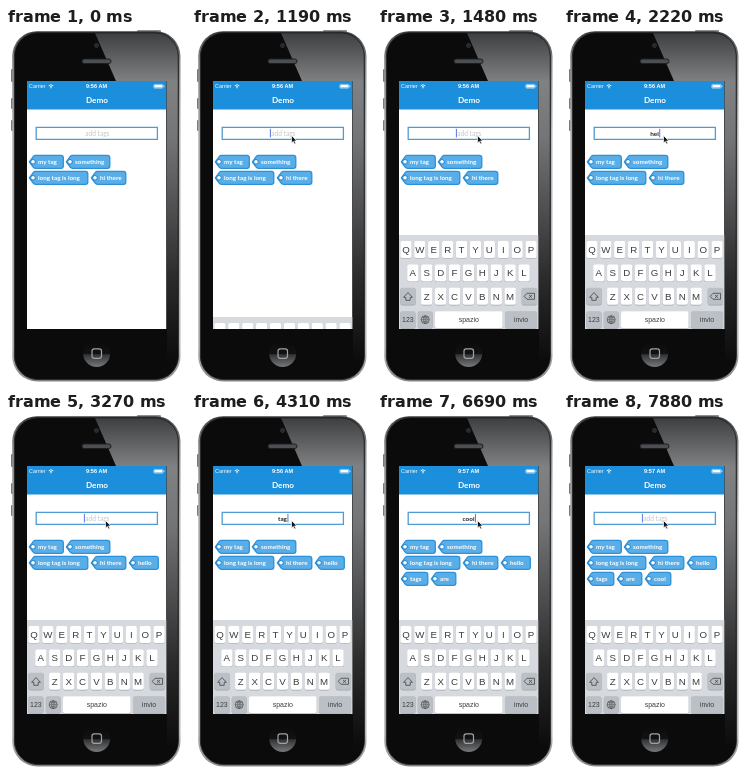
These frames come from a looping animation (180x357 px, 8000 ms). An HTML page with a canvas:

```html
<!DOCTYPE html>
<html lang="en">
<head>
<meta charset="utf-8">
<title>Tag field demo</title>
<style>
  html, body { margin: 0; width: 100%; height: 100%; overflow: hidden; background: #fff; }
  canvas { display: block; width: 180px; height: 357px; }
</style>
</head>
<body>
<canvas></canvas>
<script>
const LOOP = 8000, W = 180, H = 357;
const BLUE = '#1b8fdc', SCREEN = { x: 21, y: 53, w: 139.5, h: 248 };
const canvas = document.querySelector('canvas');
const c = canvas.getContext('2d');
const dpr = window.devicePixelRatio || 1;
canvas.width = W * dpr;
canvas.height = H * dpr;

function box(x, y, w, h, r, fill, stroke, line = 1) {
  c.beginPath();
  c.roundRect(x, y, w, h, r);
  paint(fill, stroke, line);
}
function dot(x, y, r, fill, stroke, line = 1) {
  c.beginPath();
  c.arc(x, y, r, 0, 7);
  paint(fill, stroke, line);
}
function paint(fill, stroke, line) {
  if (fill) { c.fillStyle = fill; c.fill(); }
  if (stroke) { c.strokeStyle = stroke; c.lineWidth = line; c.stroke(); }
}
function path(d, fill, stroke, line) {
  const p = new Path2D(d);
  if (fill) { c.fillStyle = fill; c.fill(p); }
  if (stroke) { c.strokeStyle = stroke; c.lineWidth = line; c.stroke(p); }
}
function text(s, x, y, size, color, align = 'center', font = 'Lato', weight = 400) {
  c.font = `${weight} ${size}px ${font}, sans-serif`;
  c.textAlign = align;
  c.fillStyle = color;
  c.fillText(s, x, y);
}
function gradient(x0, y0, x1, y1, ...stops) {
  const g = c.createLinearGradient(x0, y0, x1, y1);
  stops.forEach(([at, color]) => g.addColorStop(at, color));
  return g;
}

function phone() {
  box(131, 2, 24, 4, 1, '#8d9092');
  [[41, 13], [70, 11], [92, 11]].forEach(([y, h]) => box(5, y, 3, h, 1, '#77797b'));
  box(6.2, 3.2, 168.3, 350.3, 25, gradient(0, 3, 0, 354,
    [0, '#3c3e40'], [.08, '#85888b'], [.3, '#b4b6b8'], [.9, '#b4b6b8'], [1, '#85888b']));
  box(8.4, 4.6, 164, 347, 23.5, '#0b0b0c', '#2a2b2c', 1);
  c.save();
  c.beginPath();
  c.roundRect(9, 5.2, 162.8, 345.8, 22.5);
  c.clip();
  path('M89 5H173V352H161V53H110Z', gradient(0, 5, 0, 352,
    [0, '#3e3f40'], [.14, '#808183'], [.3, '#747577'], [.7, '#2c2c2d'], [.95, '#0b0b0c']));
  c.restore();
  dot(90.5, 17.5, 2, '#23282e', '#353b42', .7);
  box(76, 31, 29, 4.5, 2.2, '#4c4f52', '#1c1e20', 1);
  dot(90.7, 325.5, 13.5, gradient(0, 312, 0, 339,
    [0, '#0a0a0b'], [.5, '#121213'], [.55, '#333436'], [1, '#77787a']));
  box(86, 320.8, 9.5, 9.5, 2.2, null, '#a0a2a4', 1.2);
}

function header(clock) {
  c.fillStyle = BLUE;
  c.fillRect(SCREEN.x, SCREEN.y, SCREEN.w, 28.5);
  text('Carrier', 23, 60.3, 5.4, '#fff', 'left', 'Liberation Sans');
  [1.5, 3.2].forEach(r => {
    c.beginPath();
    c.arc(45, 60.1, r, -2.36, -.78);
    paint(null, '#fff', .9);
  });
  dot(45, 59.8, .6, '#fff');
  text(clock + ' AM', 90.5, 60.3, 5.5, '#fff', 'center', 'Liberation Sans', 700);
  box(147.8, 56.4, 9.2, 3.8, .8, null, '#fff', .5);
  box(148.4, 57, 8, 2.6, .3, '#fff');
  box(157.6, 57.5, .7, 1.6, .2, '#fff');
  text('Demo', 91, 75.2, 8.2, '#fff', 'center', 'Lato', 700);
}

function field(value, caret) {
  box(30.2, 99.3, 121.2, 12, 0, '#fff', '#4f9bd2', 1.3);
  if (value) text(value, 90.5, 107.9, 6.4, '#222', 'center', 'Lato', 700);
  else text('add tags', 91.3, 107.9, 6.6, '#c4c6ca');
  if (caret) {
    c.fillStyle = '#4269d8';
    c.fillRect(value ? 91 + c.measureText(value).width / 2 : 77.9, 100.8, .9, 8.6);
  }
}

function tag(label, x, row, w) {
  c.save();
  c.translate(x, 127 + 16 * row);
  path(`M.4 6.9L4.2 1.5Q5 .4 6.5 .4H${w - 3}Q${w - .7} .4 ${w - .7} 2.9V10.9Q${w - .7} 13.3 ${w - 3} 13.3H6.5Q5 13.3 4.2 12.2Z`,
    '#5aaee7', '#2a91da', 1.3);
  dot(4, 6.8, 2.3, '#fff', '#1f82cd', 1);
  text(label, 9, 9.1, 6.3, '#fff', 'left', 'Lato', 700);
  c.restore();
}

function key(x, y, w, label, size, fill = '#fff') {
  box(x, y + .6, w, 17, 1.8, '#a2a5aa');
  box(x, y, w, 17, 1.8, fill);
  if (label) text(label, x + w / 2, y + 8.5 + size * .36, size, '#3c3d40', 'center', 'Liberation Sans');
}

function keyboard(top) {
  const gray = '#bbc0c7';
  c.save();
  c.translate(0, top);
  c.fillStyle = '#d6d9dd';
  c.fillRect(SCREEN.x, 0, SCREEN.w, 100);
  [['QWERTYUIOP', 22.3], ['ASDFGHJKL', 29.2], ['ZXCVBNM', 43.1]].forEach(([row, x], r) =>
    [...row].forEach((ch, i) => key(x + 13.9 * i, 6 + 23.4 * r, 11.3, ch, 9.7)));
  key(22.3, 52.8, 15.4, '', 0, gray);
  path('M30 57.6L34.4 62.3H32.2V65.3H27.8V62.3H25.6Z', null, '#444', .8);
  key(143.7, 52.8, 15.4, '', 0, gray);
  path('M146.2 61.3L149 58.3H156.5V64.3H149ZM151 59.9L154 62.8M154 59.9L151 62.8', null, '#444', .8);
  key(22.3, 76.2, 15.2, '123', 7, gray);
  key(39.8, 76.2, 14.8, '', 0, gray);
  dot(47.2, 84.7, 4, null, '#444', .7);
  path('M43.2 84.7H51.2M47.2 80.7V88.7M47.2 80.7Q43.4 84.7 47.2 88.7Q51 84.7 47.2 80.7M44.2 82.2Q47.2 83.6 50.2 82.2M44.2 87.2Q47.2 85.8 50.2 87.2', null, '#444', .5);
  key(57, 76.2, 67.6, 'spazio', 7);
  key(127, 76.2, 32.1, 'invio', 7, gray);
  c.restore();
}

function pointer(x, y) {
  c.save();
  c.translate(x, y);
  path('M0 0V7.4L1.8 5.9L3 8.6L4.3 8L3.1 5.4H5.3Z', '#111', '#fff', .7);
  c.restore();
}

// [label, x, row, width, time of arrival]
const tags = [
  ['my tag', 23, 0, 35, 0], ['something', 60, 0, 44.5, 0],
  ['long tag is long', 23, 1, 59.5, 0], ['hi there', 85, 1, 35.5, 0],
  ['hello', 123, 1, 30, 2670], ['tags', 23, 2, 27.5, 4750],
  ['are', 53, 2, 25.5, 5640], ['cool', 81, 2, 26.5, 7140]
];
const typing = [
  [0, ''], [1780, 'h'], [1930, 'he'], [2220, 'hel'], [2370, 'hell'], [2520, 'hello'], [2670, ''],
  [3870, 't'], [4010, 'ta'], [4310, 'tag'], [4610, 'tags'], [4750, ''],
  [5050, 'a'], [5190, 'are'], [5640, ''],
  [6090, 'c'], [6240, 'co'], [6390, 'coo'], [6690, 'cool'], [7140, '']
];
const slide = [[0, 301], [1190, 289], [1340, 222], [1480, 207]];
const at = (steps, t) => steps.findLast(s => s[0] <= t)[1];
const within = (t, a, b) => t >= a && t < b;

function draw(t) {
  c.setTransform(dpr, 0, 0, dpr, 0, 0);
  c.fillStyle = '#fff';
  c.fillRect(0, 0, W, H);
  phone();

  c.save();
  c.beginPath();
  c.rect(SCREEN.x, SCREEN.y, SCREEN.w, SCREEN.h);
  c.clip();
  c.fillStyle = '#fff';
  c.fillRect(SCREEN.x, SCREEN.y, SCREEN.w, SCREEN.h);
  header(t < 5190 ? '9:56' : '9:57');
  const blink = within(t, 2820, 3270) || within(t, 7280, 7880);
  field(at(typing, t), t >= 1190 && !blink);
  tags.filter(g => t >= g[4]).forEach(g => tag(...g));
  if (t >= 1190) keyboard(at(slide, t));
  c.restore();

  if (t >= 300) {
    const p = Math.min(1, (Math.floor((t - 300) / 148) + 1) / 5);
    const rest = (1 - p) ** 2;
    pointer(99.5 + 76 * rest, 107.5 + 230 * rest);
  }
}

function frame(now) {
  draw(now % LOOP);
  requestAnimationFrame(frame);
}
requestAnimationFrame(frame);
</script>
</body>
</html>
```
